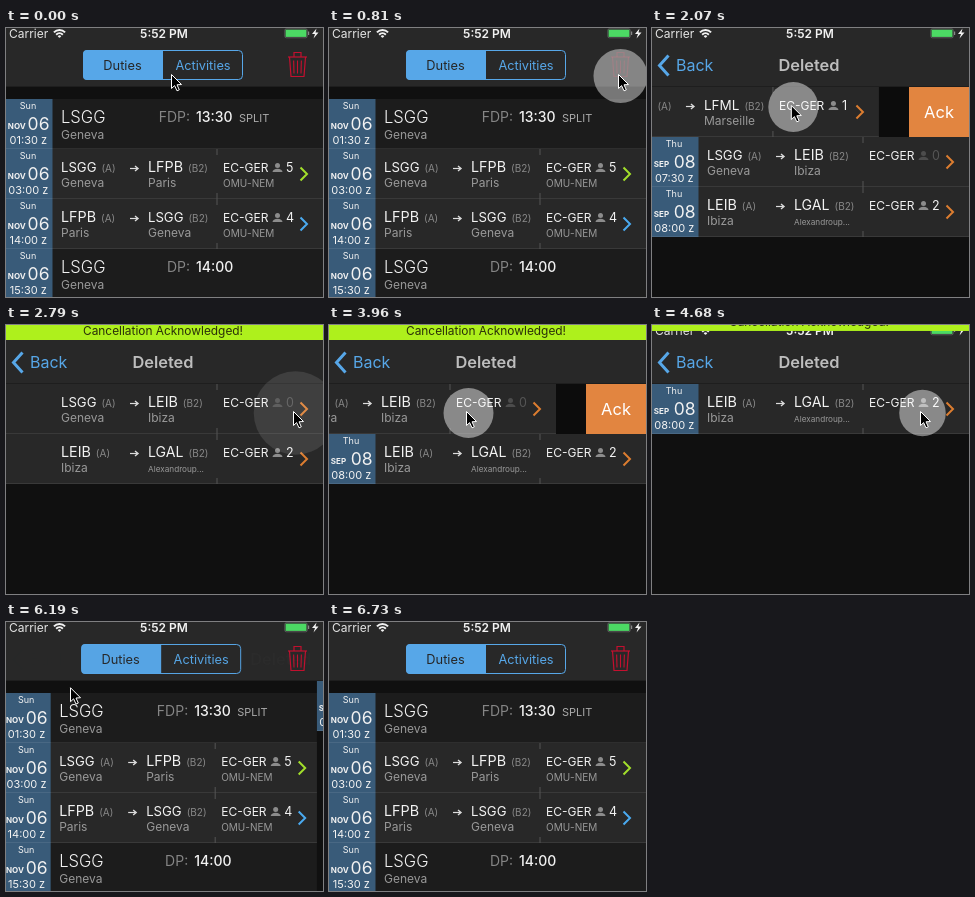
An HTML page with a canvas for the animation above (7.4 s loop, 317 by 269 pixels).

```html
<!DOCTYPE html>
<html lang="en">
<head>
<meta charset="utf-8">
<title>Roster</title>
<style>
  html, body { margin: 0; width: 100%; height: 100%; overflow: hidden; background: #101010; }
  canvas { display: block; width: 317px; height: 269px; }
</style>
</head>
<body>
<canvas id="stage"></canvas>
<script>
const W = 317, H = 269, LOOP = 7400, NAV = 59, ROW = 50;
const BLUE = '#57a7e8', ORANGE = '#dc7d30', GREY = '#999', WHITE = '#f2f2f2';
const canvas = document.getElementById('stage');
const dpr = window.devicePixelRatio || 1;
canvas.width = W * dpr;
canvas.height = H * dpr;
const ctx = canvas.getContext('2d');

// Pointer tip: time, x, y
const path = [
  [60, 165, 46], [500, 289, 46], [900, 289, 46], [1500, 289, 77],
  [1650, 289, 77], [2100, 137, 77], [2200, 137, 77], [2400, 287, 86],
  [3380, 287, 86], [3900, 137, 86], [4050, 137, 86], [4240, 268, 86],
  [5130, 268, 86], [5680, 38, 37], [6030, 38, 37], [6640, 189, 201]
];
const touches = [[530, 800], [1600, 2150], [2420, 2600], [3320, 3990],
                 [4250, 4385], [4640, 4930], [5730, 5900]];

const duties = [
  { date: ['Sun', 'NOV', '06', '01:30 z'], code: 'LSGG', city: 'Geneva', label: 'FDP:', time: '13:30', note: 'SPLIT' },
  { date: ['Sun', 'NOV', '06', '03:00 z'], from: ['LSGG', 'Geneva'], to: ['LFPB', 'Paris'], crew: 'OMU-NEM', seats: 5, color: '#a2df2b' },
  { date: ['Sun', 'NOV', '06', '14:00 z'], from: ['LFPB', 'Paris'], to: ['LSGG', 'Geneva'], crew: 'OMU-NEM', seats: 4, color: '#4aaaf0' },
  { date: ['Sun', 'NOV', '06', '15:30 z'], code: 'LSGG', city: 'Geneva', label: 'DP:', time: '14:00', note: '' }
];
const deleted = [
  { date: ['Wed', 'AUG', '24', '06:00 z'], from: ['LFPG', 'Paris'], to: ['LFML', 'Marseille'], seats: 1, color: ORANGE, swipe: [1600, 2150], gone: 2600 },
  { date: ['Thu', 'SEP', '08', '07:30 z'], from: ['LSGG', 'Geneva'], to: ['LEIB', 'Ibiza'], seats: 0, color: ORANGE, swipe: [3320, 3990], gone: 4385 },
  { date: ['Thu', 'SEP', '08', '08:00 z'], from: ['LEIB', 'Ibiza'], to: ['LGAL', 'Alexandroup...'], seats: 2, color: ORANGE }
];

const clamp = v => Math.max(0, Math.min(1, v));
const progress = (t, start, length) => clamp((t - start) / length);
const easeOut = p => 1 - (1 - p) ** 3;
const easeInOut = p => p * p * (3 - 2 * p);

function pointer(t) {
  const next = path.findIndex(k => k[0] > t);
  if (next === 0) return path[0].slice(1);
  if (next < 0) return path.at(-1).slice(1);
  const [t0, x0, y0] = path[next - 1], [t1, x1, y1] = path[next];
  const p = easeInOut((t - t0) / (t1 - t0));
  return [x0 + (x1 - x0) * p, y0 + (y1 - y0) * p];
}

function text(s, x, y, size, color, align = 'left', weight = 400) {
  ctx.font = `${weight} ${size}px Inter, sans-serif`;
  ctx.textAlign = align;
  ctx.fillStyle = color;
  ctx.fillText(s, x, y);
  return ctx.measureText(s).width;
}

// Labels pick a smaller font size when they would outgrow their column.
function label(s, x, y, size, max, color) {
  ctx.font = `400 ${size}px Inter, sans-serif`;
  return text(s, x, y, size * Math.min(1, max / ctx.measureText(s).width), color);
}

function rect(x, y, w, h, color) {
  ctx.fillStyle = color;
  ctx.fillRect(x, y, w, h);
}

function line(points, color, width) {
  ctx.beginPath();
  points.forEach(([x, y]) => ctx.lineTo(x, y));
  ctx.strokeStyle = color;
  ctx.lineWidth = width;
  ctx.stroke();
}

function disc(x, y, r, color) {
  ctx.beginPath();
  ctx.arc(x, y, r, 0, 7);
  ctx.fillStyle = color;
  ctx.fill();
}

function group(x, y, alpha, draw) {
  if (alpha <= 0) return;
  ctx.save();
  ctx.translate(x, y);
  ctx.globalAlpha *= alpha;
  draw();
  ctx.restore();
}

function drawDate([day, month, number, time]) {
  rect(0, 0, 46.5, ROW, '#395b79');
  text(day, 22, 10, 9, WHITE, 'center');
  text(month, 1.8, 30, 8, WHITE, 'left', 700);
  text(number, 43.5, 31, 17.5, WHITE, 'right');
  text(time, 22.3, 44.5, 11, WHITE, 'center');
}

function drawPerson(x, y, color) {
  disc(x + 5, y + 2.5, 2.5, color);
  ctx.beginPath();
  ctx.ellipse(x + 5, y + 9, 5, 3.2, 0, Math.PI, 0);
  ctx.fill();
}

function drawStop([code, city], kind, x) {
  const width = label(code, x, 23, 14.3, 35.5, WHITE);
  text(kind, x + width + 5, 22.5, 10, '#888');
  label(city, x, 38, 12, 56, GREY);
}

function drawFlight(row) {
  for (const y of [0, 44]) rect(210.5, y, 1, 6, '#555');
  drawStop(row.from, '(A)', 55);
  line([[124, 19.5], [131, 19.5]], '#ddd', 1.2);
  line([[129, 17], [132, 19.5], [129, 22]], '#ddd', 1.4);
  drawStop(row.to, '(B2)', 142);
  text('EC-GER', 217, 23, 12, WHITE);
  drawPerson(266.5, 14, row.seats ? '#8c8c8c' : '#4c4c4c');
  text(row.seats, 280, 23, 12.5, row.seats ? WHITE : '#555');
  if (row.crew) text(row.crew, 217, 38, 10, GREY);
  line([[294.5, 18.5], [301, 25], [294.5, 31.5]], row.color, 2);
}

function drawDuty(row) {
  text(row.code, 55, 24, 16.6, WHITE, 'left', 300);
  text(row.city, 55, 40, 12, GREY);
  text(row.label, 184, 23, 14, '#858585', 'right');
  text(row.time, 190, 23, 14, WHITE, 'left', 500);
  text(row.note, 233, 23, 11, '#aaa');
}

function drawRow(row, dateAlpha = 1) {
  rect(0, 0, W, ROW, row.code ? '#1c1c1c' : '#282828');
  group(0, 0, dateAlpha, () => drawDate(row.date));
  rect(0, ROW - 1, W, 1, 'rgba(255,255,255,0.08)');
  (row.code ? drawDuty : drawFlight)(row);
}

function drawDuties() {
  rect(0, NAV, W, H, '#101010');
  duties.forEach((row, i) => group(0, 71 + i * ROW, 1, () => drawRow(row)));
}

function swipeOffset(row, t) {
  if (!row.swipe || t < row.swipe[0]) return 0;
  const [start, end] = row.swipe;
  const drag = pointer(start)[0] - pointer(Math.min(t, end))[0];
  const pulled = drag < 60 ? drag : 60 + (drag - 60) / 3;
  return pulled + (60 - pulled) * easeOut(progress(t, end, 260));
}

function drawDeleted(t) {
  rect(0, NAV, W, H, '#101010');
  let top = NAV, dateAlpha = 1;
  for (const row of deleted) {
    const removal = easeOut(progress(t, row.gone, 170));
    const left = swipeOffset(row, t);
    group(0, top, 1 - removal, () => {
      if (left) {
        rect(0, 0, W, ROW, '#0c0c0c');
        rect(257, 0, 60, ROW, '#e28540');
        text('Ack', 287, 31, 16.5, '#fff', 'center');
      }
      group(-left, 0, 1, () => drawRow(row, dateAlpha));
    });
    top += ROW * (1 - removal);
    if (t >= row.gone) dateAlpha *= progress(t, row.gone + 200, 90);
  }
}

function drawTrash() {
  const red = '#c4102f';
  line([[282, 29], [301, 29]], red, 1.2);
  line([[288, 29], [288, 24.5], [295, 24.5], [295, 29]], red, 1.2);
  line([[283.5, 29], [285, 48.5], [298, 48.5], [299.5, 29]], red, 1.2);
  for (const x of [-3.5, 0, 3.5]) line([[291.5 + x * 1.1, 32.5], [291.5 + x, 45.5]], red, 1.1);
}

function drawSegments() {
  ctx.beginPath();
  ctx.roundRect(77.5, 22.5, 159, 29, 4);
  ctx.strokeStyle = BLUE;
  ctx.lineWidth = 1;
  ctx.stroke();
  ctx.beginPath();
  ctx.roundRect(77, 22, 80, 30, [4, 0, 0, 4]);
  ctx.fillStyle = BLUE;
  ctx.fill();
  text('Duties', 116.5, 41.5, 12.8, '#262626', 'center');
  text('Activities', 197, 41.5, 12.8, BLUE, 'center');
}

function drawNav(t, p) {
  rect(0, 0, W, NAV, '#282828');
  rect(0, NAV - 1, W, 1, '#1e1e1e');
  group(-95 * p, 0, 1 - p, drawSegments);
  group(0, 0, (1 - p) * (t > 530 && t < 850 ? 0.3 : 1), drawTrash);
  group(120 * (1 - p), 0, p, () => text('Deleted', 157, 43, 16.4, '#bdbdbd', 'center', 600));
  group(0, 0, p * (t > 5730 ? 0.25 : 1), () => {
    line([[16.5, 27.5], [7.5, 37.5], [16.5, 47.5]], BLUE, 3);
    text('Back', 24, 43, 16, BLUE);
  });
}

function drawStatus() {
  text('Carrier', 3, 10, 12, '#e4e4e4');
  for (const r of [1.5, 4.7, 7.9]) {
    ctx.beginPath();
    ctx.arc(53.5, 10, r, -Math.PI * 0.75, -Math.PI * 0.25);
    ctx.strokeStyle = WHITE;
    ctx.lineWidth = 2;
    ctx.stroke();
  }
  text('5:52 PM', 158, 10, 12, WHITE, 'center', 600);
  ctx.beginPath();
  ctx.roundRect(278.8, 0.8, 22.4, 9, 1.5);
  ctx.strokeStyle = '#777';
  ctx.lineWidth = 0.6;
  ctx.stroke();
  rect(279.6, 1.7, 20.8, 7.2, '#4cd964');
  rect(302, 3.5, 1.2, 3.5, '#888');
  ctx.beginPath();
  for (const [x, y] of [[310.5, 0.5], [306, 6], [309, 6], [307.5, 10.5], [312.5, 4.5], [309.5, 4.5]]) ctx.lineTo(x, y);
  ctx.fillStyle = WHITE;
  ctx.fill();
}

function drawBanner(t) {
  const shown = easeOut(progress(t, 2600, 170)) - easeInOut(progress(t, 4590, 160));
  group(0, -15 * (1 - shown), shown > 0 ? 1 : 0, () => {
    rect(0, 0, W, 15, '#aef01c');
    text('Cancellation Acknowledged!', 157, 10, 11.9, '#2a3008', 'center');
  });
}

function drawTouches(t) {
  for (const [down, up] of touches) {
    if (t < down || t > up + 250) continue;
    const [x, y] = pointer(Math.min(t, up));
    const fade = progress(t, up, 250);
    const r = 23 + 2 * progress(t, down, 300) + 17 * easeOut(fade);
    disc(x + 2.5, y + 2, r, `rgba(255,255,255,${0.45 * (1 - fade)})`);
  }
}

function drawPointer(t) {
  if (t >= 6730) return;
  const [x, y] = pointer(t);
  group(x, y, 1, () => {
    ctx.beginPath();
    for (const [px, py] of [[0.5, 0.5], [0.5, 14.5], [3.6, 11.6], [6, 16.8], [8.3, 15.8], [6, 10.8], [10.5, 10.5]]) ctx.lineTo(px, py);
    ctx.closePath();
    ctx.fillStyle = '#000';
    ctx.fill();
    ctx.strokeStyle = '#fff';
    ctx.lineWidth = 1;
    ctx.stroke();
  });
}

function draw(t) {
  ctx.setTransform(dpr, 0, 0, dpr, 0, 0);
  const p = easeOut(progress(t, 850, 370)) - easeOut(progress(t, 5920, 370));
  group(-95 * p, 0, p < 1 ? 1 : 0, drawDuties);
  group(W * (1 - p), 0, p > 0 ? 1 : 0, () => drawDeleted(t));
  drawNav(t, p);
  drawStatus();
  drawBanner(t);
  drawTouches(t);
  drawPointer(t);
}

const began = performance.now();
function tick() {
  draw((performance.now() - began) % LOOP);
  requestAnimationFrame(tick);
}
tick();
</script>
</body>
</html>
```
